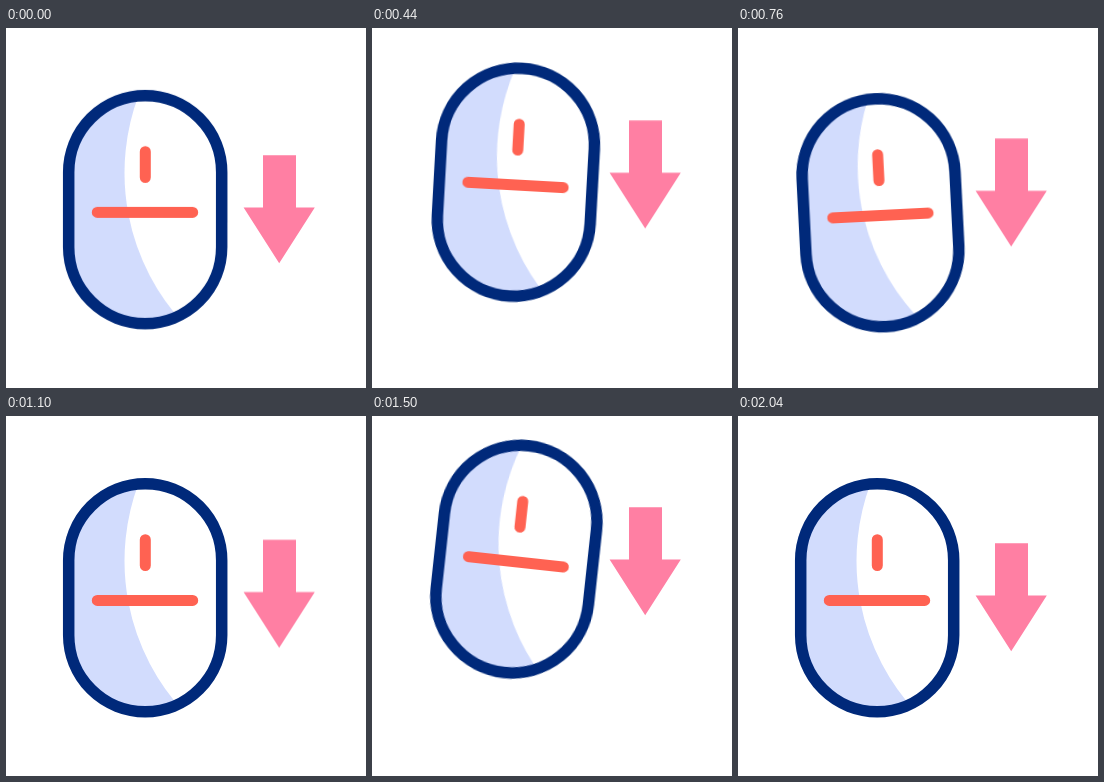
An HTML page that plays this animation: 360x360 px, repeating every 2.12 s.

```html
<!DOCTYPE html>
<html lang="en">
<head>
<meta charset="utf-8">
<title>Scroll down</title>
<style>
  html, body { margin: 0; width: 100%; height: 100%; overflow: hidden; background: #fff; }
  svg { display: block; width: 100vw; height: 100vh; }

  .mouse, .sway, .arrow {
    animation: 2120ms cubic-bezier(.37, 0, .63, 1) infinite;
  }
  .mouse { animation-name: swing; transform-origin: 139.2px 181.7px; }
  .sway { animation-name: sway; }
  .arrow { animation-name: bob; fill: #ff7fa3; }

  .shell { fill: none; stroke: #00297a; stroke-width: 11.5; }
  .shade { fill: #d2dcfd; }
  .mark { fill: none; stroke: #ff6252; stroke-width: 11; stroke-linecap: round; }

  /* lift and tilt right, drop and tilt left, settle */
  @keyframes swing {
    0%, .38%, 42.83%, 52.26%, 94.72%, 100% { transform: translate(0, 0) rotate(0deg); }
    14.53%, 66.42% { transform: translate(6.5px, -51px) rotate(9.6deg); }
    28.68%, 80.57% { transform: translate(6.8px, 6.2px) rotate(-6deg); }
  }

  /* bows the path to the left between the poses */
  @keyframes sway {
    0%, .38%, 14.53%, 28.68%, 52.26%, 66.42%, 80.57%, 100% { transform: translateX(0); }
    7.45%, 59.34% { transform: translateX(-4px); }
    21.6%, 73.5% { transform: translateX(-2px); }
  }

  @keyframes bob {
    0%, 47.17%, 94.34%, 100% { transform: translateY(0); }
    23.58%, 70.75% { transform: translateY(-36px); }
  }
</style>
</head>
<body>
<svg viewBox="0 0 360 360">
  <defs>
    <clipPath id="inside">
      <rect x="62.7" y="67.7" width="153" height="228" rx="76.5"/>
    </clipPath>
  </defs>
  <g class="sway">
    <g class="mouse">
      <g clip-path="url(#inside)">
        <path class="shade" d="M135.5 60A221 221 0 0 0 182 300H50V60Z"/>
      </g>
      <rect class="shell" x="62.7" y="67.7" width="153" height="228" rx="76.5"/>
      <path class="mark" d="M139.3 123.7V149.5M91.3 184.4H186.7"/>
    </g>
  </g>
  <path class="arrow" d="M257 127.3H290V179.6H308.8L273.2 235.3L237.6 179.6H257Z"/>
</svg>
</body>
</html>
```
